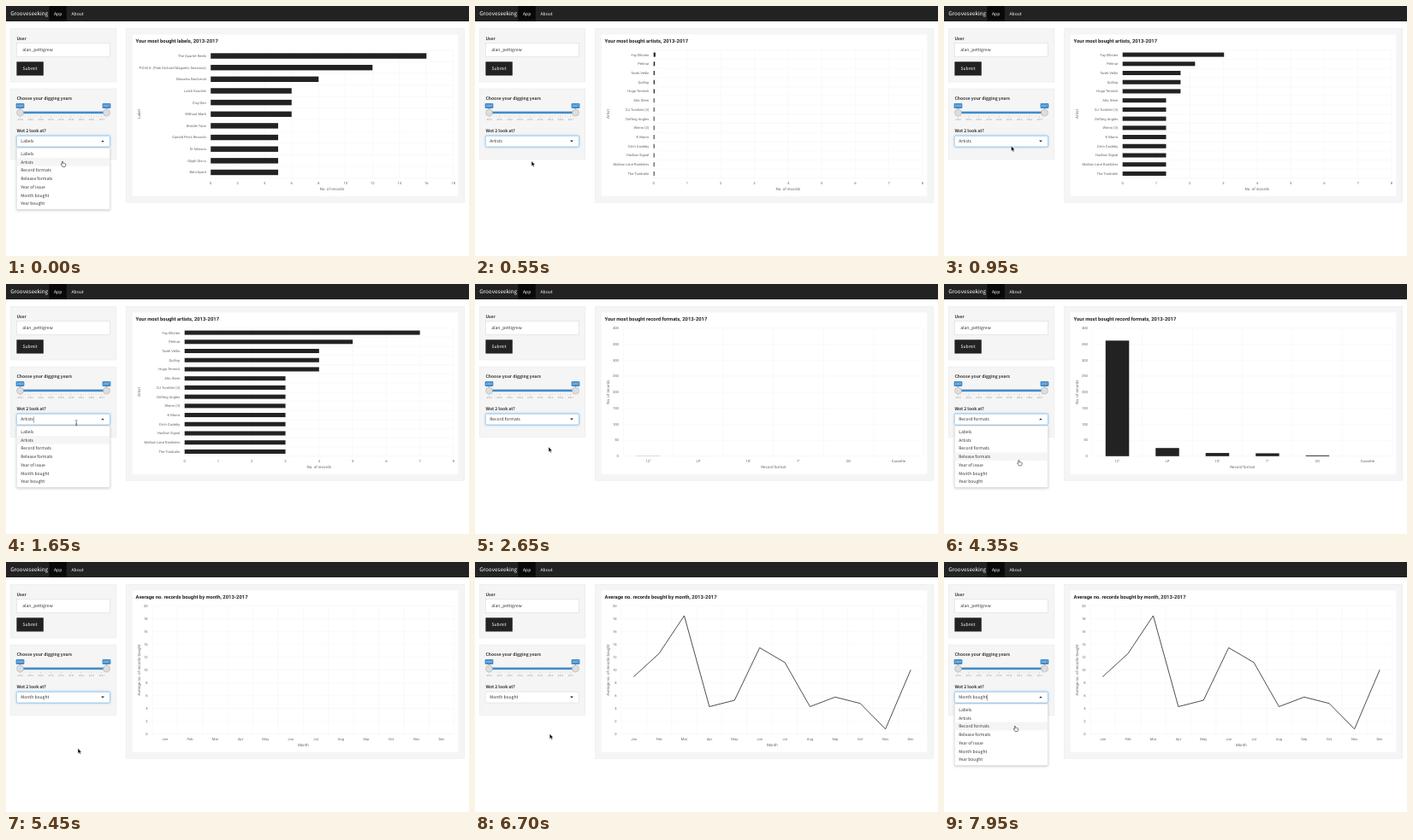
Animation of 541x293 px, one loop 8 s. Source, as an HTML page:

```html
<!DOCTYPE html>
<html lang="en">
<head>
<meta charset="utf-8">
<title>Record collection dashboard</title>
<style>
html, body { margin: 0; width: 100%; height: 100%; overflow: hidden; background: #fff; }
svg { display: block; width: 541px; height: 293px; }
text {
  font: 5.03px "Noto Sans CJK JP", "Noto Sans CJK SC", "Noto Sans CJK KR", "Noto Sans CJK TC", "Noto Sans CJK", sans-serif;
  fill: #333; text-rendering: geometricPrecision; white-space: pre;
}
.brand { font-size: 6.375px; }
.light { fill: #fff; }
.bold { font-weight: 700; }
.mid { text-anchor: middle; }
.end { text-anchor: end; }
.tag { font-size: 3.3px; fill: #fff; }
.year { font-size: 2.9px; fill: #999; }
.title { font: 700 5.87px Roboto, sans-serif; fill: #222; }
.tick { font: 4.13px Roboto, sans-serif; fill: #666; }
.axis { font: 4.51px Roboto, sans-serif; fill: #666; }
.well { fill: #f5f5f5; stroke: #e3e3e3; stroke-width: .38; }
.field { fill: #fff; stroke: #ccc; stroke-width: .4; }
.focus { fill: #fff; stroke: #66afe9; stroke-width: .5; filter: drop-shadow(0 0 1.4px rgba(102,175,233,.65)); }
.menu { fill: #fff; stroke: #ccc; stroke-width: .38; filter: drop-shadow(0 1.1px 1.7px rgba(0,0,0,.2)); }
.grid { stroke: #f0f0f0; stroke-width: .4; }
.bar { fill: #222; }
.line { fill: none; stroke: #222; stroke-width: .8; stroke-linejoin: round; stroke-linecap: round; }
</style>
</head>
<body>
<svg id="stage" viewBox="0 0 541 293"></svg>
<script>
const LOOP = 8000, TOP = 51.7, BOTTOM = 201.8;
const ROW = 9.77, MENU_TOP = 166.2, ROWS_TOP = 168.1;
const stage = document.getElementById('stage');

function add(parent, tag, attrs = {}, content) {
  const el = document.createElementNS('http://www.w3.org/2000/svg', tag);
  for (const key in attrs) el.setAttribute(key, attrs[key]);
  if (content !== undefined) el.textContent = content;
  return parent.appendChild(el);
}
const group = (parent = stage, attrs) => add(parent, 'g', attrs);
const box = (parent, x, y, width, height, attrs) => add(parent, 'rect', { x, y, width, height, ...attrs });
const text = (parent, x, y, str, cls = '', attrs) => add(parent, 'text', { x, y, class: cls, ...attrs }, str);
const line = (parent, x1, y1, x2, y2) => add(parent, 'line', { x1, y1, x2, y2, class: 'grid' });
const show = (el, on) => el.setAttribute('visibility', on ? 'visible' : 'hidden');
const clamp = v => Math.min(1, Math.max(0, v));
const easeSine = v => (1 - Math.cos(Math.PI * clamp(v))) / 2;

// Navigation bar
box(stage, 0, 0, 541, 18, { fill: '#222' });
box(stage, 50.4, 0, 20.4, 18, { fill: '#090909' });
text(stage, 5.2, 11, 'Grooveseeking', 'brand light');
text(stage, 56, 10.8, 'App', 'light');
text(stage, 76.5, 10.8, 'About', 'light');

// Panels
box(stage, 5.2, 26.2, 123.7, 62.8, { class: 'well' });
box(stage, 5.2, 97, 123.7, 82.6, { class: 'well' });
box(stage, 140.6, 26.2, 395.2, 204, { class: 'well' });
box(stage, 147.8, 33.4, 380.4, 189.4, { fill: '#fff' });

text(stage, 12.4, 39.7, 'User', 'bold');
box(stage, 12.4, 43.6, 109.1, 15.9, { class: 'field' });
text(stage, 19.3, 53.4, 'alan_pettigrew');
box(stage, 12.4, 65.3, 31.4, 16.2, { fill: '#222' });
text(stage, 28.1, 75.3, 'Submit', 'light mid');

// Year slider
text(stage, 12.4, 110.1, 'Choose your digging years', 'bold');
box(stage, 16.5, 123.6, 101, 2.6, { fill: '#428bca' });
for (let i = 0; i <= 34; i++) {
  box(stage, 16.5 + i * 2.97, 128.4, .3, i % 4 ? 1.4 : 2.6, { fill: i % 4 ? '#bbb' : '#999' });
}
for (let i = 0; i < 9; i++) text(stage, 16.7 + i * 11.9, 134.4, 2013 + (i >> 1), 'year mid');
[[16.5, 2013], [117.5, 2017]].forEach(([x, year]) => {
  box(stage, x - 4.9, 114, 9.8, 5.9, { rx: 1, fill: '#428bca' });
  add(stage, 'path', { d: `M${x - 1} 119.8h2l-1 1.2z`, fill: '#428bca' });
  text(stage, x, 118.2, year, 'tag mid');
  add(stage, 'circle', { cx: x, cy: 125, r: 4, fill: '#dedede', stroke: '#999', 'stroke-width': .4 });
});

// Charts
const charts = [
  {
    at: -2000, title: 'Your most bought labels, 2013-2017', across: true,
    left: 239.2, right: 522.8, max: 18, step: 2, catTitle: 'Label', valTitle: 'No. of records',
    cats: ['The Quartet Reels', 'P.O.M.S. (Pale Orchard Magnetic Sessions)', 'Mazurka Nocturnal',
      'Latch Knuckle', 'Clay Den', 'Without Mark', 'Brindle Tone', "Candid Pim's Records",
      'Dr Maraca', 'Glyph Discs', 'Benchyard'],
    vals: [16, 12, 8, 6, 6, 6, 5, 5, 5, 5, 5]
  },
  {
    at: 495, title: 'Your most bought artists, 2013-2017', across: true,
    left: 208.7, right: 522.9, max: 8, step: 1, catTitle: 'Artist', valTitle: 'No. of records',
    cats: ['Fay Ellisten', 'Pelmar', 'Tarek Vellin', 'Quillop', 'Hugo Tennick', 'Alto Stem',
      'DJ Tumbler (3)', 'Drifting Angles', 'Wrenn (3)', 'K Morro', 'Orrin Casleby',
      'Hadlow Signal', 'Mallow Lane Ramblers', 'The Tundralin'],
    vals: [7, 5, 4, 4, 4, 3, 3, 3, 3, 3, 3, 3, 3, 3]
  },
  {
    at: 2630, title: 'Your most bought record formats, 2013-2017',
    left: 173.3, right: 524.1, max: 400, step: 50, catTitle: 'Record format', valTitle: 'No. of records',
    cats: ['12"', 'LP', '10"', '7"', 'CD', 'Cassette'],
    vals: [361, 25.5, 10, 9, 2.5, 0]
  },
  {
    at: 5450, title: 'Average no. records bought by month, 2013-2017', curve: true,
    left: 171, right: 523.7, max: 20, step: 2, catTitle: 'Month', valTitle: 'Average no. of records bought',
    cats: 'Jan Feb Mar Apr May Jun Jul Aug Sep Oct Nov Dec'.split(' '),
    vals: [9, 12.6, 18.5, 4.3, 5.3, 13.5, 11.2, 4.3, 5.8, 4.8, .8, 10]
  }
];

function buildChart(c) {
  const { left, right, max, across } = c;
  const g = c.el = group();
  const n = c.cats.length, width = right - left, height = BOTTOM - TOP;
  const slot = (across ? height : width) / n;
  const vLine = x => line(g, x, TOP, x, BOTTOM);
  const hLine = y => line(g, left, y, right, y);
  const bottomLabel = (x, s) => text(g, x, 208.9, s, 'tick mid');
  const sideLabel = (y, s) => text(g, left - 5.4, y + 1.45, s, 'tick end');

  text(g, 151.6, 42.7, c.title, 'title');
  text(g, (left + right) / 2, 215.8, across ? c.valTitle : c.catTitle, 'axis mid');
  text(g, 0, 0, across ? c.catTitle : c.valTitle, 'axis mid', { transform: 'translate(157 126.6) rotate(-90)' });

  for (let v = 0; v <= max; v += c.step) {
    const x = left + width * v / max, y = BOTTOM - height * v / max;
    if (across) { vLine(x); bottomLabel(x, v); }
    else { hLine(y); sideLabel(y, v); }
  }
  for (let i = 0; i <= n; i++) across ? hLine(TOP + i * slot) : vLine(left + i * slot);

  const marks = c.marks = group(g);
  const points = c.vals.map((v, i) => {
    const mid = (across ? TOP : left) + (i + .5) * slot, size = slot * .47;
    const len = (across ? width : height) * v / max;
    if (across) {
      sideLabel(mid, c.cats[i]);
      box(marks, left, mid - size / 2, len, size, { class: 'bar' });
    } else {
      bottomLabel(mid, c.cats[i]);
      if (!c.curve) box(marks, mid - size / 2, BOTTOM - len, size, len, { class: 'bar' });
    }
    return [mid, BOTTOM - len];
  });
  if (c.curve) {
    c.clip = box(add(g, 'clipPath', { id: 'reveal' }), left, TOP, 0, height);
    add(marks, 'polyline', { points: points.join(' '), class: 'line', 'clip-path': 'url(#reveal)' });
  }
}
charts.forEach(buildChart);

function drawCharts(t) {
  charts.forEach((c, i) => {
    const next = charts[i + 1];
    const on = t >= c.at && !(next && t >= next.at);
    show(c.el, on);
    if (!on) return;
    const k = easeSine((t - c.at) / 1000);
    if (c.curve) c.clip.setAttribute('width', (c.right - c.left) * k);
    else c.marks.setAttribute('transform', c.across
      ? `translate(${c.left * (1 - k)} 0) scale(${k} 1)`
      : `translate(0 ${BOTTOM * (1 - k)}) scale(1 ${k})`);
  });
}

// Select box and its menu
const options = ['Labels', 'Artists', 'Record formats', 'Release formats', 'Year of issue', 'Month bought', 'Year bought'];
text(stage, 12.4, 148.3, 'Wot 2 look at?', 'bold');
const frame = { rx: 1.3 };
box(stage, 12.3, 152.2, 109.2, 12.8, { ...frame, class: 'field' });
const focus = box(stage, 12.3, 152.2, 109.2, 12.8, { ...frame, class: 'focus' });
const chosen = text(stage, 17.2, 160.4, '');
const caret = box(stage, 0, 155.4, .4, 7.2, { fill: '#222' });
const arrow = add(stage, 'path', { fill: '#222' });
const menu = group();
box(menu, 12.3, MENU_TOP, 109.2, 72.3, { class: 'menu' });
const hover = box(menu, 12.5, 0, 108.8, ROW, { fill: '#f5f5f5' });
options.forEach((s, i) => text(menu, 17.2, ROWS_TOP + i * ROW + 6.75, s));

// Each visit: opening time, closing time, option shown until it closes
const visits = [[-910, 300, 0], [1350, 2350, 1], [3500, 5100, 2], [7450, LOOP, 5]];
const BLINK = 530;

function drawSelect(t, y) {
  const [from, , picked] = visits.find(v => t < v[1]);
  const open = t >= from;
  if (chosen.textContent !== options[picked]) chosen.textContent = options[picked];
  show(menu, open);
  show(caret, open && Math.floor((t - from) / BLINK) % 2 === 0);
  caret.setAttribute('x', 17.4 + chosen.getComputedTextLength());
  arrow.setAttribute('d', open ? 'M111.1 159.3h3.8l-1.9 -1.9z' : 'M111.1 157.5h3.8l-1.9 1.9z');
  const row = y > ROWS_TOP ? Math.floor((y - ROWS_TOP) / ROW) : picked;
  hover.setAttribute('y', ROWS_TOP + row * ROW);
  focus.setAttribute('opacity', t < 7000 ? 1 - clamp((t - 6500) / 150) : clamp((t - 7380) / 150));
  return open;
}

// Mouse pointer
const pointer = group();
const looks = {
  arrow: add(pointer, 'path', {
    d: 'M0 0V5.8L1.35 4.6 2.3 6.7 3.3 6.3 2.4 4.2H4.2Z', fill: '#000', stroke: '#fff', 'stroke-width': .4
  }),
  hand: add(pointer, 'path', {
    d: 'M-.6 .6Q0 -.5 .6 .6V2.5Q1.3 2 1.8 2.7 2.5 2.3 2.9 3 3.8 2.8 3.8 3.8 3.8 5.2 3 6.6H0Q-.4 5.4 -1.8 4 -1.9 3 -.6 3.8Z',
    fill: '#fff', stroke: '#000', 'stroke-width': .5, 'stroke-linejoin': 'round'
  }),
  beam: add(pointer, 'path', {
    d: 'M-1.2 -3Q0 -3 0 -2.4 0 -3 1.2 -3M0 -2.4V2.4M-1.2 3Q0 3 0 2.4 0 3 1.2 3M-.6 .9H.6',
    fill: 'none', stroke: '#111', 'stroke-width': .5
  })
};
const route = [
  [0, 66, 181.8], [650, 66, 181.8], [950, 78.6, 164.2], [1250, 82.2, 162.7], [1650, 82.2, 162.7],
  [2050, 86, 191], [2700, 86, 191], [3100, 89.6, 183.2], [3400, 101, 161], [3900, 101, 161],
  [4350, 87.5, 206.3], [4700, 84, 218.6], [6500, 84, 218.4], [7050, 95, 161], [7800, 95, 161],
  [7950, 83, 192], [LOOP, 83, 192]
];

function pointerAt(t) {
  const i = route.findIndex(p => p[0] > t);
  const [t0, x0, y0] = route[i - 1], [t1, x1, y1] = route[i];
  const k = easeSine((t - t0) / (t1 - t0));
  return [x0 + (x1 - x0) * k, y0 + (y1 - y0) * k];
}

function draw(t) {
  const [x, y] = pointerAt(t);
  drawCharts(t);
  const open = drawSelect(t, y);
  const look = open ? (y > MENU_TOP ? 'hand' : 'beam') : (y < 163.8 ? 'hand' : 'arrow');
  for (const name in looks) show(looks[name], name === look);
  pointer.setAttribute('transform', `translate(${x} ${y})`);
}

const start = performance.now();
function tick() {
  draw((performance.now() - start) % LOOP);
  requestAnimationFrame(tick);
}
tick();
</script>
</body>
</html>
```
